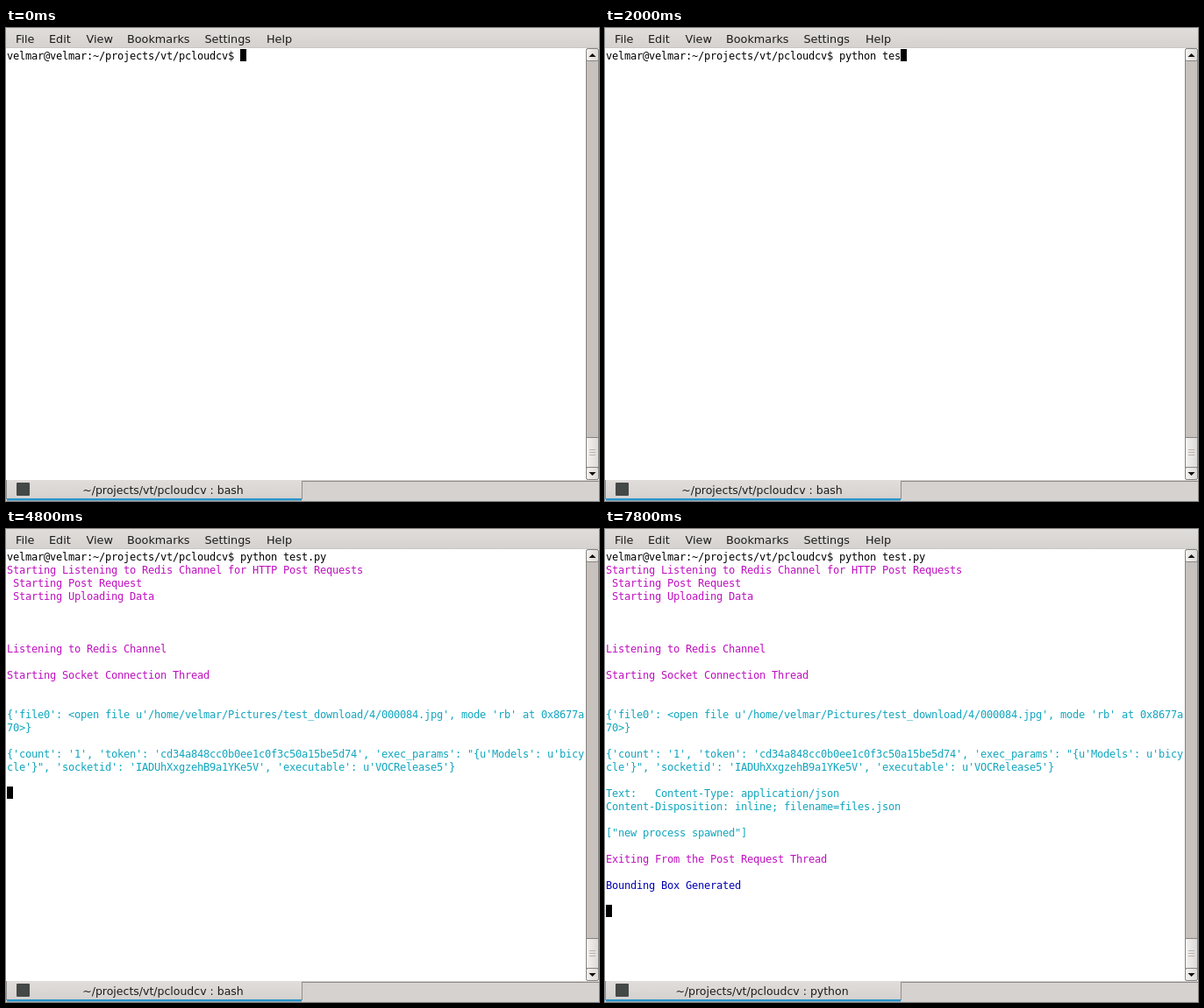
An HTML page for the animation above (8000 ms loop, 676 px wide and 540 px high).

```html
<!DOCTYPE html>
<html lang="en">
<head>
<meta charset="utf-8">
<title>Terminal session</title>
<style>
  html, body { margin: 0; width: 100%; height: 100%; overflow: hidden; background: #fff; }
  svg { display: block; width: 676px; height: 540px; }
  text { white-space: pre; }
  .ui { font: 12.8px "DejaVu Sans", sans-serif; fill: #1c1c1c; }
  .term { font: 12px "DejaVu Sans Mono", monospace; letter-spacing: -.224px; }
</style>
</head>
<body>
<svg viewBox="0 0 676 540" xmlns="http://www.w3.org/2000/svg">
  <defs>
    <linearGradient id="bar" x2="0" y2="1">
      <stop stop-color="#e0dddb"/><stop offset="1" stop-color="#d5d1ce"/>
    </linearGradient>
    <linearGradient id="knob">
      <stop stop-color="#f4f3f2"/><stop offset="1" stop-color="#dcd9d6"/>
    </linearGradient>
  </defs>
  <rect width="676" height="540" fill="#fff"/>

  <rect width="676" height="23" fill="url(#bar)"/>
  <rect y="22" width="676" height="1" fill="#cbc7c4"/>
  <g id="menu" class="ui"></g>

  <g id="screen" class="term"></g>
  <rect id="cursor" width="7" height="14"/>

  <g stroke="#85827f">
    <rect x="661.5" y="23.5" width="14" height="492" rx="2" fill="#c7c2bd"/>
    <g fill="url(#knob)">
      <rect x="661.5" y="23.5" width="14" height="14" rx="2"/>
      <rect x="661.5" y="467.5" width="14" height="34"/>
      <rect x="661.5" y="501.5" width="14" height="14" rx="2"/>
    </g>
    <path d="M665 481.5h7M665 484.5h7M665 487.5h7" stroke="#b5b1ad"/>
  </g>
  <path d="M664.5 33h8l-4-4zM664.5 507h8l-4 4z" fill="#111"/>

  <rect y="516" width="676" height="24" fill="#d6d2d0"/>
  <rect x="338" y="517" width="338" height="1" fill="#8b8885"/>
  <rect y="516" width="337" height="22" fill="url(#bar)"/>
  <path d="M.5 516v22M337.5 517v21" stroke="#918e8b"/>
  <rect x="1" y="537" width="336" height="2" fill="#2795cb"/>
  <rect x="1" y="539" width="336" height="1" fill="#85a9bb"/>
  <rect x="12" y="519" width="15" height="15" rx="1" fill="#444847"/>
  <text id="tab" class="ui" x="179" y="532" text-anchor="middle" style="font-size:12.5px"></text>
</svg>
<script>
const LOOP = 8000, KEY = 200, COL = 7, ROW = 15, LEFT = 1, TOP = 24;
const PINK = '#c00fc0', CYAN = '#10a6be', BLUE = '#0000b4';
const USER = 'velmar', DIR = '~/projects/vt/pcloudcv';
const PROMPT = `${USER}@${USER}:${DIR}$ `, COMMAND = 'python test.py ';

// [time shown, row, colour, text]
const OUTPUT = [
  [3800, 1, PINK, 'Starting Listening to Redis Channel for HTTP Post Requests'],
  [3800, 2, PINK, ' Starting Post Request'],
  [3800, 3, PINK, ' Starting Uploading Data'],
  [3800, 7, PINK, 'Listening to Redis Channel'],
  [3800, 9, PINK, 'Starting Socket Connection Thread'],
  [4800, 12, CYAN, `{'file0': <open file u'/home/${USER}/Pictures/test_download/4/000084.jpg', mode 'rb' at 0x8677a`],
  [4800, 13, CYAN, '70>}'],
  [4800, 15, CYAN, `{'count': '1', 'token': 'cd34a848cc0b0ee1c0f3c50a15be5d74', 'exec_params': "{u'Models': u'bicy`],
  [4800, 16, CYAN, `cle'}", 'socketid': 'IADUhXxgzehB9a1YKe5V', 'executable': u'VOCRelease5'}`],
  [6800, 18, CYAN, 'Text:   Content-Type: application/json'],
  [6800, 19, CYAN, 'Content-Disposition: inline; filename=files.json'],
  [6800, 21, CYAN, '["new process spawned"]'],
  [6800, 23, PINK, 'Exiting From the Post Request Thread'],
  [7800, 25, BLUE, 'Bounding Box Generated']
];
// [time, cursor row] once the command runs
const CURSOR = [[2800, 1], [3800, 12], [4800, 18], [6800, 25], [7800, 27]];
const MENU = [['File', 11], ['Edit', 49], ['View', 91.5], ['Bookmarks', 138], ['Settings', 226.5], ['Help', 297]];

const $ = id => document.getElementById(id);

function addText(parent, x, y, str, fill) {
  const el = document.createElementNS('http://www.w3.org/2000/svg', 'text');
  el.setAttribute('x', x);
  el.setAttribute('y', y);
  if (fill) el.setAttribute('fill', fill);
  el.textContent = str;
  return parent.appendChild(el);
}

const addRow = (row, str, fill) => addText($('screen'), LEFT, TOP + row * ROW + 12, str, fill);

MENU.forEach(([name, x]) => addText($('menu'), x, 17, name));
const shell = addRow(0, PROMPT, '#000');
const lines = OUTPUT.map(([at, row, fill, str]) => ({ at, el: addRow(row, str, fill) }));

function setText(el, str) {
  if (el.textContent !== str) el.textContent = str;
}

function render(t) {
  // The last keystroke completes the file name.
  const typed = t < 2600 ? Math.floor(t / KEY) : COMMAND.length;
  setText(shell, PROMPT + COMMAND.slice(0, typed));
  lines.forEach(({ at, el }) => el.setAttribute('visibility', t >= at ? 'visible' : 'hidden'));

  let col = PROMPT.length + typed, row = 0;
  for (const [at, r] of CURSOR) if (t >= at) { col = 0; row = r; }
  $('cursor').setAttribute('x', LEFT + col * COL);
  $('cursor').setAttribute('y', TOP + row * ROW);

  setText($('tab'), `${DIR} : ${t < 5800 ? 'bash' : 'python'}`);
}

const start = performance.now();
function tick() {
  render((performance.now() - start) % LOOP);
  requestAnimationFrame(tick);
}
render(0);
requestAnimationFrame(tick);
</script>
</body>
</html>
```
